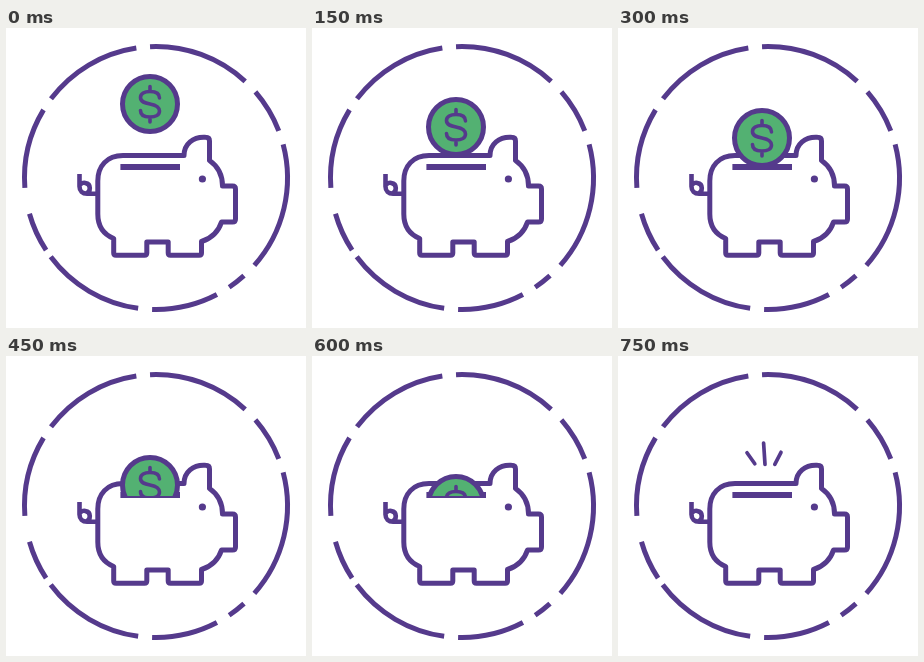
An HTML page with a canvas that plays this animation: 300 px wide and 300 px high, repeating every 0.9 s.

```html
<!DOCTYPE html>
<html lang="en">
<head>
<meta charset="utf-8">
<title>Piggy bank</title>
<style>
  html, body { margin: 0; width: 100%; height: 100%; overflow: hidden; background: #fff; }
  canvas { display: block; width: 300px; height: 300px; }
</style>
</head>
<body>
<canvas id="stage"></canvas>
<script>
const PURPLE = '#553a8c', GREEN = '#53b172';
const STEP = 150, STEPS = 6;
const COIN_Y = [76, 99, 110, 129, 148];
const SLOT_Y = 136, SLOT_DEPTH = 140;

// Start and end of each ring dash, in degrees clockwise from the right
const DASHES = [
  [-92.6, -47.3], [-40.9, -21], [-14.8, 41.6], [48, 56.2], [62.4, 91.7],
  [97.8, 143.2], [146.7, 164.2], [175.7, 211.2], [217, 261.4]
];

const body = new Path2D(`
  M178 127.5 H117 C101 127.5 91.8 138 91.8 153 V186
  C91.8 198 98 206.5 107.7 210.5 V225 Q107.7 227.3 110 227.3
  H138.5 Q140.8 227.3 140.8 225 V214 H162.2 V225 Q162.2 227.3 164.5 227.3
  H193.2 Q195.5 227.3 195.5 225 V213.5 C205 210.5 212.5 203.5 215.5 194
  H226.5 Q229.5 194 229.5 191 V161 Q229.5 158 226.5 158 H216.5
  C216.5 147 211.5 138 203.5 132.5 V113 Q203.5 109.3 199.5 109.3
  C187 108.5 178 116 178 127.5 Z`);
const tail = new Path2D(`
  M73.5 146 V158.5 C73.5 163 76.5 165.7 81 165.7 H92
  M74 157.5 C75 153.5 83.8 153.8 83.8 160 C83.8 163 82.5 165 80 165.5`);
const dollar = new Path2D(`
  M9.5 -6 C9.5 -10.5 5.5 -12.5 0 -12.5 C-5.5 -12.5 -9.5 -10.5 -9.5 -6.5
  C-9.5 -2 -5 -1 0 0 C5 1 9.5 2.5 9.5 7 C9.5 11 5.5 13 0 13
  C-5.5 13 -9.5 11 -9.5 6.5 M0 -17.5 V-12.5 M0 13 V18`);
const rays = new Path2D('M129 96.8 L136.8 107.8 M145.6 87 L147 108.3 M163 96.3 L156.8 108.3');

const canvas = document.getElementById('stage');
const ctx = canvas.getContext('2d');
const ratio = window.devicePixelRatio || 1;
canvas.width = canvas.height = 300 * ratio;

function line(path, width, cap = 'butt') {
  ctx.lineWidth = width;
  ctx.lineCap = cap;
  ctx.stroke(path);
}

function circle(x, y, r) {
  const path = new Path2D();
  path.arc(x, y, r, 0, Math.PI * 2);
  return path;
}

function drawRing() {
  for (const [from, to] of DASHES) {
    const dash = new Path2D();
    dash.arc(150, 150, 131.5, from * Math.PI / 180, to * Math.PI / 180);
    line(dash, 5);
  }
}

function drawPig() {
  line(body, 5);
  line(tail, 4.6);
  ctx.fillStyle = PURPLE;
  ctx.fill(circle(196.4, 151, 3.6));
  ctx.fillRect(114.4, SLOT_Y, 59.6, 6);
}

function drawCoin(y, depth) {
  ctx.save();
  ctx.beginPath();
  ctx.rect(0, 0, 300, depth);
  ctx.clip();
  ctx.translate(144, y);
  const face = circle(0, 0, 27.5);
  ctx.fillStyle = GREEN;
  ctx.fill(face);
  line(face, 5);
  line(dollar, 3.6, 'round');
  ctx.restore();
}

function draw(time) {
  const step = Math.floor(time / STEP) % STEPS;
  ctx.setTransform(ratio, 0, 0, ratio, 0, 0);
  ctx.fillStyle = '#fff';
  ctx.fillRect(0, 0, 300, 300);
  ctx.strokeStyle = PURPLE;
  ctx.lineJoin = 'round';
  drawRing();
  drawPig();
  if (step < COIN_Y.length) drawCoin(COIN_Y[step], step < 3 ? SLOT_Y : SLOT_DEPTH);
  else line(rays, 3.7, 'round');
}

const start = performance.now();
function tick() {
  draw(performance.now() - start);
  requestAnimationFrame(tick);
}
tick();
</script>
</body>
</html>
```
